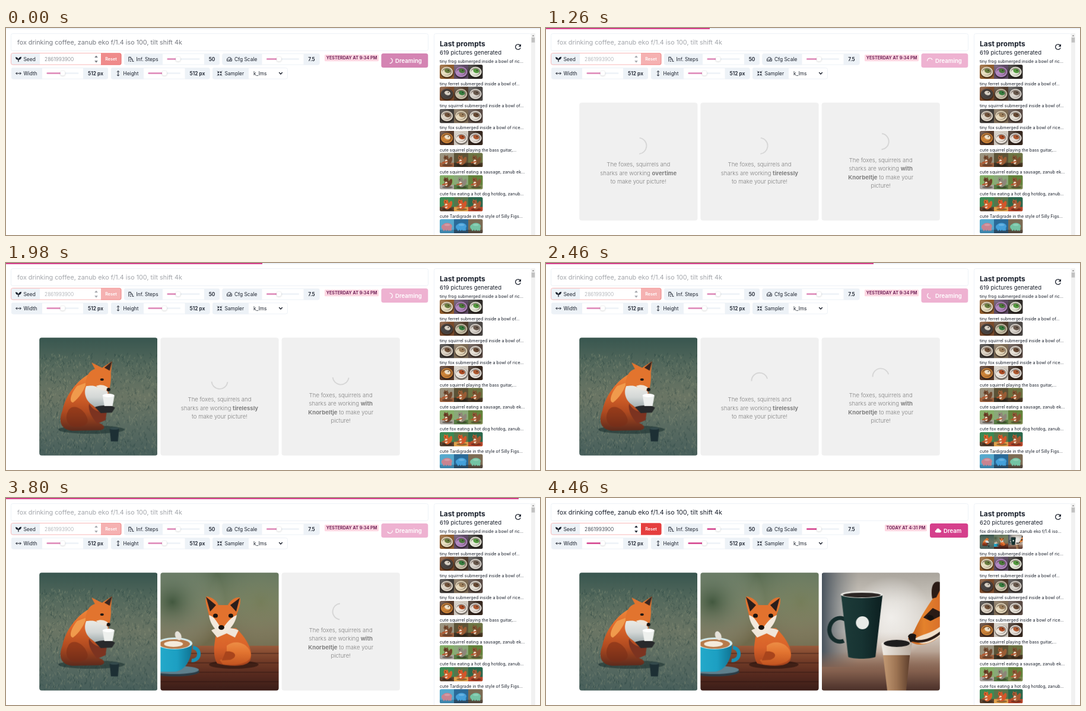
An HTML page with a canvas for the animation above (4940 ms loop, 900 by 350 pixels).

```html
<!DOCTYPE html>
<html lang="en">
<head>
<meta charset="utf-8">
<title>Image generator</title>
<style>
html, body { margin: 0; width: 100%; height: 100%; overflow: hidden; background: #fff; }
canvas { display: block; width: 900px; height: 350px; }
</style>
</head>
<body>
<canvas id="stage" width="900" height="350"></canvas>
<script>
const LOOP = 4940, DONE = 4200;
const INK = '#1a202c', PINK = '#d53f8c', GRAY = '#edf2f7';
const SHOWN = [1700, 2980, DONE];
const ctx = document.getElementById('stage').getContext('2d');
ctx.imageSmoothingQuality = 'high';

const BAR = [[90, 0], [600, 108], [1260, 276], [1370, 300], [1440, 300], [1980, 432],
  [2460, 552], [2660, 600], [2700, 600], [3200, 720], [3800, 864], [3950, 900]];
const SPIN = [[0, -1325], [1260, 0], [1980, 810], [2460, 1340], [3200, 2250], [3800, 3060], [4340, 3720]];

function interp(keys, t) {
  if (t <= keys[0][0]) return keys[0][1];
  for (let i = 1; i < keys.length; i++) {
    const [t0, a] = keys[i - 1], [t1, b] = keys[i];
    if (t <= t1) return a + (b - a) * (t - t0) / (t1 - t0);
  }
  return keys[keys.length - 1][1];
}

// Drawing helpers
function box(x, y, w, h, r, fill, line) {
  ctx.beginPath();
  ctx.roundRect(x, y, w, h, r);
  if (fill) { ctx.fillStyle = fill; ctx.fill(); }
  if (line) { ctx.strokeStyle = line; ctx.lineWidth = 1; ctx.stroke(); }
}
function text(str, x, y, size, weight = 400, color = INK, align = 'left') {
  ctx.font = `${weight} ${size}px Inter, sans-serif`;
  ctx.textAlign = align;
  ctx.fillStyle = color;
  ctx.fillText(str, x, y);
}
function faded(alpha, draw) {
  ctx.globalAlpha = alpha;
  draw();
  ctx.globalAlpha = 1;
}
function icon(x, y, path, filled, color = INK, width = 1) {
  ctx.save();
  ctx.translate(x, y);
  ctx.lineWidth = width;
  ctx.strokeStyle = ctx.fillStyle = color;
  const p = new Path2D(path);
  filled ? ctx.fill(p) : ctx.stroke(p);
  ctx.restore();
}
function spinner(x, y, r, width, color, deg) {
  const a = deg * Math.PI / 180;
  ctx.beginPath();
  ctx.arc(x, y, r, a - 1.45, a + 1.45);
  ctx.strokeStyle = color;
  ctx.lineWidth = width;
  ctx.stroke();
}
function clipped(x, y, w, h, r, draw) {
  ctx.save();
  ctx.beginPath();
  ctx.roundRect(x, y, w, h, r);
  ctx.clip();
  draw();
  ctx.restore();
}

// Pictures, drawn once on a 200 x 200 grid
function sprite(draw) {
  const cv = document.createElement('canvas');
  cv.width = cv.height = 200;
  const c = cv.getContext('2d');
  const rect = (color, x, y, w, h) => { c.fillStyle = color; c.fillRect(x, y, w, h); };
  const shape = (color, path) => { c.fillStyle = color; c.fill(new Path2D(path)); };
  const oval = (color, x, y, rx, ry = rx, turn = 0) => {
    c.fillStyle = color;
    c.beginPath();
    c.ellipse(x, y, rx, ry, turn, 0, 7);
    c.fill();
  };
  const blend = (x0, y0, x1, y1, ...colors) => {
    const g = c.createLinearGradient(x0, y0, x1, y1);
    colors.forEach((color, i) => g.addColorStop(i / (colors.length - 1), color));
    return g;
  };
  const fade = (...colors) => rect(blend(0, 0, 0, 200, ...colors), 0, 0, 200, 200);
  const glow = (color, x, y, r) => {
    const g = c.createRadialGradient(x, y, 0, x, y, r);
    g.addColorStop(0, color);
    g.addColorStop(1, 'rgba(255,255,255,0)');
    rect(g, 0, 0, 200, 200);
  };
  draw({ c, rect, shape, oval, blend, fade, glow });
  return cv;
}
function random(seed) {
  return () => (seed = (seed * 16807) % 2147483647) / 2147483647;
}

const meadowFox = sprite(({ c, shape, oval, blend, fade }) => {
  fade('#38564f', '#566a5d', '#6a7564', '#596b61', '#485f5b');
  const rnd = random(41);
  for (let i = 0; i < 1300; i++) {
    const x = rnd() * 200, y = 30 + rnd() * 170;
    c.strokeStyle = rnd() < .5 ? 'rgba(165,168,135,.3)' : 'rgba(22,50,50,.35)';
    c.beginPath();
    c.moveTo(x, y);
    c.lineTo(x + rnd() * 6 - 3, y - 2 - rnd() * 4);
    c.stroke();
  }
  oval('rgba(20,42,42,.55)', 88, 156, 56, 7);
  shape(blend(0, 60, 0, 158, '#ee8a3c', '#dc6529', '#b04a20', '#5d2a1c'),
    'M84 62C64 72 44 98 39 124C32 142 36 156 56 158L103 157C116 154 108 146 98 144L112 126L118 96L112 78Z');
  shape('rgba(120,44,22,.55)', 'M50 122C58 112 74 120 80 134C86 146 76 152 60 151C46 150 42 134 50 122Z');
  shape('#f09a4c', 'M64 82C52 96 50 110 57 110C68 102 76 88 80 76Z');
  shape(blend(0, 76, 0, 126, '#f0efea', '#d3d7d6', '#8b9a9c'),
    'M82 78C74 88 76 104 88 113L102 124L112 114L116 92L100 78Z');
  shape('#7c3320', 'M84 112C90 122 100 128 114 126L112 140L98 146C90 136 82 126 84 112Z');
  shape('#e2742e', 'M78 82C78 66 84 56 94 53L88 42L106 51L123 40L121 60C122 70 120 82 118 90C108 90 106 84 98 84C90 80 86 82 78 82Z');
  shape('#3a2620', 'M110 51L123 40L119 56Z');
  shape('#eee4d8', 'M96 82C106 78 114 82 118 87C112 92 104 90 96 82Z');
  oval('#201814', 106, 71, 3, 2);
  oval('#181414', 117, 88, 3);
  shape('#27292b', 'M94 118C102 114 124 114 128 119L123 127L104 128Z');
  shape('#eef0ee', 'M107 98H127L124 116H110Z');
  oval('#ffffff', 117, 98, 10, 3);
  shape('#1d2f34', 'M119 154H135L133 176H121Z');
  oval('#344a4c', 127, 154, 8, 2);
});

const tableFox = sprite(({ c, rect, shape, oval, blend, fade, glow }) => {
  fade('#566a50', '#64704f', '#6f694b', '#6f694b', '#6f694b');
  glow('rgba(44,72,52,.6)', 20, 50, 90);
  glow('rgba(150,150,110,.35)', 170, 50, 90);
  rect(blend(0, 122, 0, 200, '#9a5c3c', '#743d28', '#55291e', '#3a1d18'), 0, 124, 200, 76);
  for (let y = 136; y < 200; y += 16) rect('rgba(35,16,12,.35)', 0, y, 200, 2);
  oval('rgba(30,14,10,.55)', 124, 156, 42, 7);
  shape(blend(0, 96, 0, 156, '#e2702c', '#d8622a', '#a8441c'),
    'M96 96C90 120 88 142 96 154C120 160 148 160 152 148C158 130 142 108 128 94Z');
  shape(blend(0, 112, 0, 158, '#f0964c', '#e27430', '#c0521f'),
    'M112 124C126 112 150 120 153 138C154 154 130 158 106 156L100 148C122 146 128 136 112 134Z');
  shape('#a8441c', 'M110 134C124 131 134 142 118 148L104 149Z');
  shape('#f0e6da', 'M86 98C92 92 124 92 132 98L126 110L112 103L96 110Z');
  shape('#e2722e', 'M82 72C78 56 74 46 78 40C88 42 96 48 98 55H114C118 47 126 41 134 42C138 52 130 66 128 74C124 90 112 100 104 102C94 98 84 86 82 72Z');
  shape('#2a1d1b', 'M77 41L94 55L84 66ZM134 43L118 55L128 66Z');
  shape('#f3e9dc', 'M82 72C92 74 96 86 104 96C112 86 118 76 129 72C126 90 112 102 104 103C94 100 84 88 82 72Z');
  oval('#17120f', 93, 73, 4, 3.5);
  oval('#17120f', 119, 73, 4, 3.5);
  oval('#17120f', 103, 93, 5, 4);
  oval('#2b3c46', 24, 168, 42, 8);
  oval('#5f7f8c', 24, 165, 41, 7);
  c.strokeStyle = '#168fb4';
  c.lineWidth = 6;
  c.beginPath();
  c.arc(54, 138, 11, -1.5, 1.7);
  c.stroke();
  shape(blend(0, 0, 56, 0, '#23a9ca', '#1c9fc2', '#0f6f8e'), 'M0 120H53C54 144 44 166 24 168H0Z');
  oval('#d4ebee', 24, 120, 30, 10);
  oval('#b77a4a', 24, 121, 26, 8);
  oval('#f5eadb', 22, 121, 16, 5);
  oval('#e6e2da', 30, 107, 5, 8, -.4);
});

const mugFox = sprite(({ c, rect, shape, oval, blend, fade, glow }) => {
  fade('#a9a49c', '#cfcac2', '#d8d2ca', '#a98e7c', '#553c33');
  rect(blend(0, 0, 62, 0, '#47525c', 'rgba(120,125,128,0)'), 0, 0, 62, 160);
  glow('rgba(245,243,240,.85)', 118, 76, 70);
  rect(blend(0, 134, 0, 200, 'rgba(140,104,84,0)', '#84604e', '#4a3029'), 0, 134, 200, 66);
  c.strokeStyle = '#152c2c';
  c.lineWidth = 7;
  c.beginPath();
  c.ellipse(31, 97, 18, 20, 0, 1.2, 5.4);
  c.stroke();
  shape(blend(33, 0, 103, 0, '#1d3b39', '#173332', '#0c1f20'), 'M33 38H103L91 143C82 147 52 147 45 143Z');
  oval('#e5e4df', 68, 37, 36, 6);
  oval('#2b2523', 68, 38, 32, 4);
  oval('#e9ebe8', 69, 85, 11);
  shape(blend(104, 0, 150, 0, '#c39a74', '#9c7352', '#5c3d2b'), 'M103 132H150L143 200H111Z');
  shape(blend(101, 0, 153, 0, '#f0ebe4', '#b9aca0'), 'M101 120C106 113 148 113 153 120L150 140H104Z');
  oval('#1d1c1d', 127, 120, 22, 6);
  shape(blend(146, 0, 200, 0, '#b8581f', '#e4822c', '#d9702a'),
    'M200 20C188 16 184 28 188 44C174 64 164 82 156 100L146 112C154 126 180 126 200 108Z');
  shape('#2a1b15', 'M200 16C188 12 184 26 187 44L194 42L200 30Z');
  shape('#f0dfca', 'M158 112C170 104 184 104 200 92V108C180 124 164 124 158 112Z');
  shape('#2a1b15', 'M172 76L188 60L200 66V74L184 82ZM152 112C168 118 184 112 200 100V105C184 118 166 122 152 116Z');
  oval('#16120f', 184, 76, 6, 4, .4);
  shape('#1c1614', 'M146 108C148 102 156 102 160 106L158 116L150 118Z');
});

const pictures = [meadowFox, tableFox, mugFox];

// Thumbnails: background, dish or ground, animal
const dish = spec => sprite(({ oval, rect, glow }) => {
  const [bg, bowl, pet] = spec.split(' ');
  rect(bg, 0, 0, 200, 200);
  glow('rgba(255,255,255,.2)', 30, 20, 120);
  oval('rgba(20,12,8,.5)', 102, 112, 92, 84);
  oval(bowl, 100, 102, 84, 72);
  oval('rgba(40,24,16,.45)', 100, 98, 68, 54);
  oval(bowl, 92, 106, 58, 40);
  oval(pet, 108, 88, 42, 30, .3);
  oval('#1c1714', 120, 80, 7);
});
const critter = spec => sprite(({ oval, shape, rect }) => {
  const [bg, ground, pet] = spec.split(' ');
  rect(bg, 0, 0, 200, 200);
  rect(ground, 0, 138, 200, 62);
  oval('rgba(20,12,8,.4)', 108, 172, 74, 16);
  oval(pet, 148, 104, 24, 52, .3);
  oval(pet, 104, 124, 44, 48);
  oval(pet, 88, 68, 34, 28);
  shape(pet, 'M62 56L64 24L84 46ZM98 46L114 24L112 60Z');
  oval('#f0dfca', 90, 124, 20, 32);
  oval('#1c1714', 78, 66, 6);
  shape('#b8562c', 'M32 128L110 112L114 128L40 146Z');
});
const bear = spec => sprite(({ oval, rect }) => {
  const [bg, ground, pet] = spec.split(' ');
  rect(bg, 0, 0, 200, 200);
  rect(ground, 0, 150, 200, 50);
  oval(pet, 104, 100, 68, 48);
  oval(pet, 54, 108, 30, 34);
  for (const x of [58, 92, 126, 152]) oval(pet, x, 142, 15, 22);
  oval('rgba(255,255,255,.2)', 104, 80, 40, 14);
});
const row = (label, make, ...specs) => ({ label, pics: specs.map(make) });

const history = [
  row('tiny frog submerged inside a bowl of ric…', dish,
    '#8f5c2c #e8dfc2 #667a3c', '#5d4a63 #b48ac4 #4a7838', '#2f2b28 #e6e9da #52983e'),
  row('tiny ferret submerged inside a bowl of…', dish,
    '#7a4a2b #494544 #d8d0c4', '#4f3a2a #c9c2aa #347a3c', '#4b4745 #d9d4cd #66564a'),
  row('tiny squirrel submerged inside a bowl of…', dish,
    '#413d3a #ddd4c6 #6e5038', '#7c6a54 #e6d9bd #9a7c58', '#594a43 #e6e1d8 #664934'),
  row('tiny fox submerged inside a bowl of rice…', dish,
    '#55392a #cb8238 #efe0c8', '#cfc8be #eee8df #ab4a22', '#38291f #e6e0d9 #ac5830'),
  row('cute squirrel playing the bass guitar,…', critter,
    '#99927e #a06440 #744a30', '#5c5236 #3c3324 #9a5c34', '#6c7444 #4b3a26 #7c5230'),
  row('cute squirrel eating a sausage, zanub ek…', critter,
    '#86b06a #a8a49c #6d4128', '#8aa878 #587a44 #8e8578', '#63843c #7c8a50 #8c5634'),
  row('cute fox eating a hot dog hotdog, zanub…', critter,
    '#3c8a54 #5c4430 #d8612a', '#58744a #e0a04c #d4562a', '#2a684c #b8482c #a45a34'),
  row('cute Tardigrade in the style of Silly Figs…', bear,
    '#56a8cc #3f86ac #c98490', '#2a6a98 #2a4a64 #44a0da', '#7c6c54 #54483c #74c4a4'),
];
const latest = { label: 'fox drinking coffee, zanub eko f/1.4 iso…', pics: pictures };

// Controls
const LEAF = 'M-.7 4.5V1C-3.5 1 -5 -1 -5 -3.5C-2 -3.5 -.5 -2 -.2 .2C.2 -2.4 2 -4 5 -4C5 -1 3 1 .6 1V4.5Z';
const STEPS = 'M-4 -4V4M-4 -3.5H-.5V-.5H2V3.5H4.5M-2 1H-.5M-2 3.5H0';
const GAUGE = 'M-4 3C-5.2 -5.2 5.2 -5.2 4 3ZM0 2.5L2 -1.5M-2.8 .5H-1.2M1.4 .5H2.8';
const ACROSS = 'M-4.3 0H4.3M-2.3 -2L-4.3 0L-2.3 2M2.3 -2L4.3 0L2.3 2';
const UPDOWN = 'M0 -4.3V4.3M-2 -2.3L0 -4.3L2 -2.3M-2 2.3L0 4.3L2 2.3';
const CORNERS = 'M-4 -4L-1.3 -1.3V-3.6M-1.3 -1.3H-3.6M4 -4L1.3 -1.3V-3.6M1.3 -1.3H3.6M-4 4L-1.3 1.3V3.6M-1.3 1.3H-3.6M4 4L1.3 1.3V3.6M1.3 1.3H3.6';
const CLOUD = 'M-3 3.2C-6 3.2 -6 -.8 -3.2 -1C-3 -4.6 2.2 -4.6 2.8 -1.2C6 -1 6 3.2 3 3.2Z';

function tag(x, y, w, label, path, filled) {
  box(x, y, w, 19.5, [3, 0, 0, 3], GRAY);
  icon(x + 12, y + 9.8, path, filled);
  text(label, x + 20.5, y + 12.7, 8.4);
}
function slider(x, y, w, at, alpha) {
  box(x, y - 1.2, w, 2.4, 1.2, GRAY);
  faded(alpha, () => box(x, y - 1.2, at - x, 2.4, 1.2, PINK));
  ctx.save();
  ctx.shadowColor = 'rgba(0,0,0,.22)';
  ctx.shadowBlur = 3;
  ctx.shadowOffsetY = .6;
  box(at - 4, y - 4, 8, 8, 4, '#fff');
  ctx.restore();
}
function field(x, y, w, tagW, valueW, label, path, at, value, alpha) {
  box(x + .5, y + .5, w - 1, 18.5, 3, null, GRAY);
  tag(x, y, tagW, label, path);
  box(x + w - valueW, y, valueW, 19.5, [0, 3, 3, 0], GRAY);
  slider(x + tagW + 7.5, y + 9.5, w - tagW - valueW - 15, at, alpha);
  text(value, x + w - valueW / 2, y + 12.7, 8.4, 600, INK, 'center');
}

function controls(t, done, alpha, deg) {
  const slide = done ? interp([[.4, .6], [1, 1]], alpha) : .6;
  box(8.5, 9.5, 703, 29, 3, null, GRAY);
  faded(alpha, () => text('fox drinking coffee, zanub eko f/1.4 iso 100, tilt shift 4k', 19, 27.6, 10.8));

  tag(9, 43, 48, 'Seed', LEAF, true);
  box(8.5, 42.5, 185.5, 19.5, 3, null, '#f8b9b9');
  faded(alpha, () => {
    text('2861993900', 65, 55.7, 8.4, 300);
    icon(152, 48.5, 'M-2.8 1.6L0 -2L2.8 1.6Z', true);
    icon(152, 56.8, 'M-2.8 -1.6L0 2L2.8 -1.6Z', true);
    box(160, 42.5, 34.5, 20, [0, 3, 3, 0], '#e53e3e');
  });
  text('Reset', 177, 55.3, 7.2, 600, '#fff', 'center');

  field(199, 43, 161, 65, 26, 'Inf. Steps', STEPS, 290, '50', slide);
  field(364.5, 43, 164, 67, 27, 'Cfg Scale', GAUGE, 460, '7.5', slide);
  field(9, 67, 163, 52, 42, 'Width', ACROSS, 95.5, '512 px', slide);
  field(177, 67, 166.5, 55, 42, 'Height', UPDOWN, 267, '512 px', slide);
  box(348.5, 67.5, 126, 18.5, 3, null, GRAY);
  tag(348, 67, 61, 'Sampler', CORNERS);
  text('k_lms', 417, 79.5, 8.4);
  icon(463, 76.5, 'M-2.8 -1.4L0 1.5L2.8 -1.4', false, INK, 1.4);

  const left = done ? 571 : 537, right = done ? 642 : 628;
  box(left, 45, right - left, 11.2, 1.5, '#fed7e2');
  text(done ? 'TODAY AT 4:31 PM' : 'YESTERDAY AT 9:34 PM', (left + right) / 2, 53.3, 7.2, 700, '#702459', 'center');

  const bx = done ? 647 : 632.5;
  faded(alpha, () => box(bx, 43, 711.3 - bx, 24, 3.5, t < 60 ? '#b83280' : PINK));
  if (done) {
    icon(661, 55.3, CLOUD, true, '#fff');
    text('Dream', 670, 58.5, 9.6, 600, '#fff');
  } else {
    spinner(647, 55.3, 4.3, 1.2, '#fff', deg - 105);
    text('Dreaming', 656, 58.5, 9.6, 600, '#fff');
  }
}

// Waiting cards: a word in asterisks is bold
const CARDS = [
  ['The foxes, squirrels and', 'sharks are working *overtime', 'to make your picture!'],
  ['The foxes, squirrels and', 'sharks are working *tirelessly', 'to make your picture!'],
  ['The foxes, squirrels and', 'sharks are working *with', '*Knorbeltje* to make your', 'picture!'],
];
function rich(line, cx, y) {
  const runs = line.split('*').map((str, i) => [str, i % 2 ? 700 : 300]);
  const widths = runs.map(([str, weight]) => {
    ctx.font = `${weight} 9.6px Inter, sans-serif`;
    return ctx.measureText(str).width;
  });
  let x = cx - widths.reduce((a, b) => a + b) / 2;
  runs.forEach(([str, weight], i) => {
    text(str, x, y, 9.6, weight, '#808080');
    x += widths[i];
  });
}
function cards(t, deg) {
  if (t < 120) return;
  CARDS.forEach((lines, i) => {
    const x = 56.2 + 204.2 * i, cx = x + 99.6;
    if (t >= SHOWN[i]) {
      clipped(x, 126.3, 199.2, 199.2, 4, () => ctx.drawImage(pictures[i], x, 126.3, 199.2, 199.2));
      return;
    }
    const top = lines.length > 3 ? 192 : 199.3;
    box(x, 126.3, 199.2, 199.2, 4, '#f0f0f0');
    spinner(cx, top, 13.6, 1.9, '#d6d6d6', deg);
    lines.forEach((line, k) => rich(line, cx, top + 35 + 14.45 * k));
  });
}

function sidebar(done) {
  box(721.5, 9.5, 164, 360, 3, '#fff', GRAY);
  box(885, 9, 7, 341, 0, '#f1f1f1');
  icon(888.5, 13, 'M-1.8 1L0 -1.2L1.8 1Z', true, '#8a8a8a');
  box(885.7, 16, 5.6, 8.5, 0, '#c1c1c1');
  text('Last prompts', 731, 31.3, 12, 700);
  text(`${done ? 620 : 619} pictures generated`, 731, 44.6, 9.6);
  icon(863, 32, 'M3.6 -2.6A4.4 4.4 0 1 0 4.2 1.4', false, INK, 1.3);
  icon(863, 32, 'M5 -5V-.6H.6Z', true);
  const rows = done ? [latest, ...history.slice(0, 7)] : history;
  rows.forEach(({ label, pics }, i) => {
    const y = 62 + 37.33 * i;
    text(label, 731, y - 2.6, 7.2);
    clipped(731, y, 72.5, 24, 2.5, () =>
      pics.forEach((pic, k) => ctx.drawImage(pic, 731 + 24.17 * k, y, 24.17, 24)));
  });
}

function render(t) {
  const done = t >= DONE;
  const alpha = interp([[40, .6], [120, .4], [DONE, .4], [4340, 1]], t);
  const deg = interp(SPIN, t);
  ctx.fillStyle = '#fff';
  ctx.fillRect(0, 0, 900, 350);
  if (!done) {
    box(0, 0, 900, 2, 0, GRAY);
    box(0, 0, Math.round(interp(BAR, t) / 6) * 6, 2, 0, PINK);
  }
  controls(t, done, alpha, deg);
  cards(t, deg);
  sidebar(done);
}

const start = performance.now();
function tick() {
  render((performance.now() - start) % LOOP);
  requestAnimationFrame(tick);
}
tick();
</script>
</body>
</html>
```
